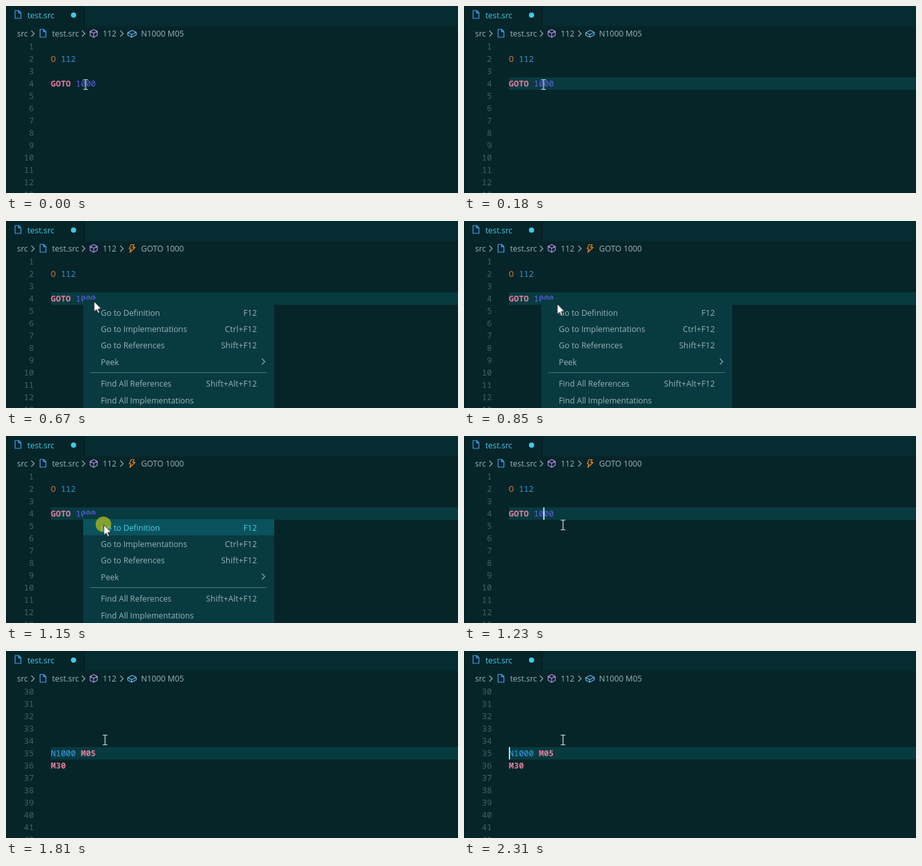
These frames come from a looping animation (696 px wide and 288 px high, 2700 ms). An HTML page:

```html
<!DOCTYPE html>
<html lang="en">
<head>
<meta charset="utf-8">
<title>Go to definition</title>
<style>
  html, body { margin: 0; width: 100%; height: 100%; overflow: hidden; background: #062529; }
  svg { display: block; width: 696px; height: 288px; }
  text { white-space: pre; fill: currentColor; }
  .ui { font: 12.35px "Open Sans", "Noto Sans", sans-serif; color: #9ab5b8; }
  .code { font: 12.83px "Noto Sans Mono", "DejaVu Sans Mono", monospace; }
  .nums { color: #436268; text-anchor: end; }
  .title { color: #40cbee; }
  .key { fill: #e27d9d; font-weight: 700; }
  .keys { text-anchor: end; letter-spacing: .2px; }
  .icon { fill: none; stroke-width: 1.2; stroke-linejoin: round; }
  .row { fill: #083b40; }
  .caret { fill: #a5e6f2; }

  .anim { animation: 2.7s step-end infinite; }
  #first { animation-name: first; }
  #second { animation-name: second; }
  #line { animation-name: line; }
  #caret1 { animation-name: caret1; }
  #caret2 { animation-name: caret2; }
  #range { animation-name: range; }
  #crumbN { animation-name: crumbN; }
  #crumbGoto { animation-name: crumbGoto; }
  #menu { animation-name: menu; }
  #hot { animation-name: hot; }
  #hotText { animation-name: hotText; }
  #click { animation-name: click; }
  #beam { animation-name: beam; }
  #arrow { animation-name: arrow; }

  @keyframes first { 0% { opacity: 1 } 48.519%, 100% { opacity: 0 } }
  @keyframes second { 0% { opacity: 0 } 48.519%, 100% { opacity: 1 } }
  @keyframes line { 0% { opacity: 0 } 3.704%, 100% { opacity: 1 } }
  @keyframes caret1 { 0% { opacity: 0 } 45.556%, 100% { opacity: 1 } }
  @keyframes caret2 { 0% { opacity: 1 } 67.037% { opacity: 0 } 85.556%, 100% { opacity: 1 } }
  @keyframes range { 0% { opacity: 1 } 59.63%, 100% { opacity: 0 } }
  @keyframes crumbN { 0% { opacity: 1 } 14.074% { opacity: 0 } 48.519%, 100% { opacity: 1 } }
  @keyframes crumbGoto { 0% { opacity: 0 } 14.074% { opacity: 1 } 48.519%, 100% { opacity: 0 } }
  @keyframes menu {
    0% { opacity: 0 } 7.037% { opacity: .2 } 10.37% { opacity: .58 }
    14.074% { opacity: 1 } 45.556%, 100% { opacity: 0 }
  }
  @keyframes hot { 0% { opacity: 0 } 32.222%, 100% { opacity: 1 } }
  @keyframes hotText { 0% { color: #9ab5b8 } 32.222%, 100% { color: #45d3ea } }
  @keyframes click { 0% { opacity: 0 } 42.593% { opacity: .65 } 45.556%, 100% { opacity: 0 } }
  @keyframes beam {
    0% { opacity: 1; transform: translate(122.5px, 121px) }
    7.037% { opacity: 0; transform: translate(122.5px, 121px) }
    45.556%, 100% { opacity: 1; transform: translate(152.5px, 137px) }
  }
  @keyframes arrow {
    0% { opacity: 0; transform: translate(120.5px, 120.5px) }
    7.037% { opacity: 1; transform: translate(120.5px, 120.5px) }
    21.111% { opacity: 1; transform: translate(127.5px, 121.5px) }
    24.815% { opacity: 1; transform: translate(135.5px, 123.5px) }
    28.519% { opacity: 1; transform: translate(143.5px, 127.5px) }
    32.222% { opacity: 1; transform: translate(148.5px, 133.5px) }
    35.926% { opacity: 1; transform: translate(150.5px, 136.5px) }
    45.556%, 100% { opacity: 0; transform: translate(150.5px, 136.5px) }
  }
</style>
</head>
<body>
<svg viewBox="0 0 696 288" xmlns="http://www.w3.org/2000/svg">
  <defs>
    <path id="file" d="M.5 .5H6L9.5 4V12.5H.5ZM5.8 .5V4.2H9.5"/>
    <path id="chevron" d="M0 -4.5L4.5 0L0 4.5" fill="none" stroke="#9ab5b8" stroke-width="1.1"/>
  </defs>

  <rect width="696" height="288" fill="#062529"/>
  <rect x="121" width="575" height="31" fill="#042c31"/>
  <rect x="120" width="1" height="31" fill="#031a1e"/>
  <rect width="1" height="288" fill="#041b1f"/>

  <g class="ui">
    <use href="#file" x="13.5" y="6.5" class="icon" stroke="#42a5f5"/>
    <text x="33" y="18.5" class="title">test.src</text>
    <circle cx="104" cy="14" r="4" fill="#43c7e6"/>

    <text x="17" y="46.5">src</text>
    <use href="#chevron" x="39" y="42.5"/>
    <use href="#file" x="52" y="35.5" class="icon" stroke="#42a5f5"/>
    <text x="71" y="46.5">test.src</text>
    <use href="#chevron" x="117" y="42.5"/>
    <path class="icon" stroke="#b08ee6" d="M135 36.3l5.5 2.8v6.2l-5.5 3-5.5-3v-6.2zM129.5 39.1l5.5 2.9 5.5-2.9M135 42v6.3"/>
    <text x="149" y="46.5">112</text>
    <use href="#chevron" x="176" y="42.5"/>
    <g id="crumbN" class="anim">
      <path class="icon" stroke="#68bdf8" d="M187.5 41l7-3.5 6 3v4l-7 3.5-6-3zM187.5 41l6 3 7-3.5M193.5 44v4"/>
      <text x="208" y="46.5">N1000 M05</text>
    </g>
    <g id="crumbGoto" class="anim">
      <path class="icon" stroke="#f28b26" d="M192.5 36.5h5l-2.5 4.2h3.7l-8 7.6 1.7-5.3h-2.6z"/>
      <text x="208" y="46.5">GOTO 1000</text>
    </g>
  </g>

  <g id="first" class="anim code">
    <rect id="line" class="anim row" x="69" y="110" width="627" height="19"/>
    <g class="nums" data-from="1"></g>
    <text x="69" y="86"><tspan fill="#d0743a">O</tspan><tspan fill="#3892c2"> 112</tspan></text>
    <text x="69" y="124"><tspan class="key">GOTO</tspan><tspan fill="#6160ee"> 1000</tspan></text>
    <rect id="caret1" class="anim caret" x="122" y="110" width="2" height="19"/>
  </g>

  <g id="second" class="anim code">
    <rect class="row" x="69" y="148" width="627" height="19"/>
    <rect id="range" class="anim" x="69" y="148" width="69" height="19" fill="#0b5058"/>
    <g class="nums" data-from="30"></g>
    <text x="69" y="162"><tspan fill="#3ea2f4">N1000</tspan><tspan class="key"> M05</tspan></text>
    <text x="69" y="181"><tspan class="key">M30</tspan></text>
    <rect id="caret2" class="anim caret" x="69" y="148" width="2" height="19"/>
  </g>

  <g id="menu" class="anim ui">
    <rect x="119" y="121" width="294" height="167" fill="#083a41"/>
    <rect id="hot" class="anim" x="119" y="128" width="294" height="25" fill="#0a525d"/>
    <g id="hotText" class="anim">
      <text x="146" y="146">Go to Definition</text>
      <text x="386.5" y="146" class="keys">F12</text>
    </g>
    <text x="146" y="171">Go to Implementations</text>
    <text x="386.5" y="171" class="keys">Ctrl+F12</text>
    <text x="146" y="196">Go to References</text>
    <text x="386.5" y="196" class="keys">Shift+F12</text>
    <text x="146" y="222">Peek</text>
    <use href="#chevron" x="394" y="216.5"/>
    <rect x="130" y="233" width="272" height="1" fill="#55797d"/>
    <text x="146" y="255">Find All References</text>
    <text x="386.5" y="255" class="keys">Shift+Alt+F12</text>
    <text x="146" y="280.5">Find All Implementations</text>
  </g>

  <circle id="click" class="anim" cx="150" cy="136" r="12" fill="#c8cd19"/>
  <path id="beam" class="anim" fill="none" stroke="#e8eeee" stroke-width="1.2" d="M-3.5 -7.5H-1L0 -6.8L1 -7.5H3.5M0 -7V7M-3.5 7.5H-1L0 6.8L1 7.5H3.5"/>
  <path id="arrow" class="anim" fill="#fff" stroke="#0a0a0a" d="M0 0V16.5L3.8 13L6.2 18.6L8.8 17.5L6.4 12H11.6Z"/>
</svg>
<script>
  for (const group of document.querySelectorAll('.nums')) {
    for (let i = 0; i < 13; i++) {
      const label = document.createElementNS('http://www.w3.org/2000/svg', 'text');
      label.setAttribute('x', 43);
      label.setAttribute('y', 67 + i * 19);
      label.textContent = +group.dataset.from + i;
      group.append(label);
    }
  }
</script>
</body>
</html>
```
